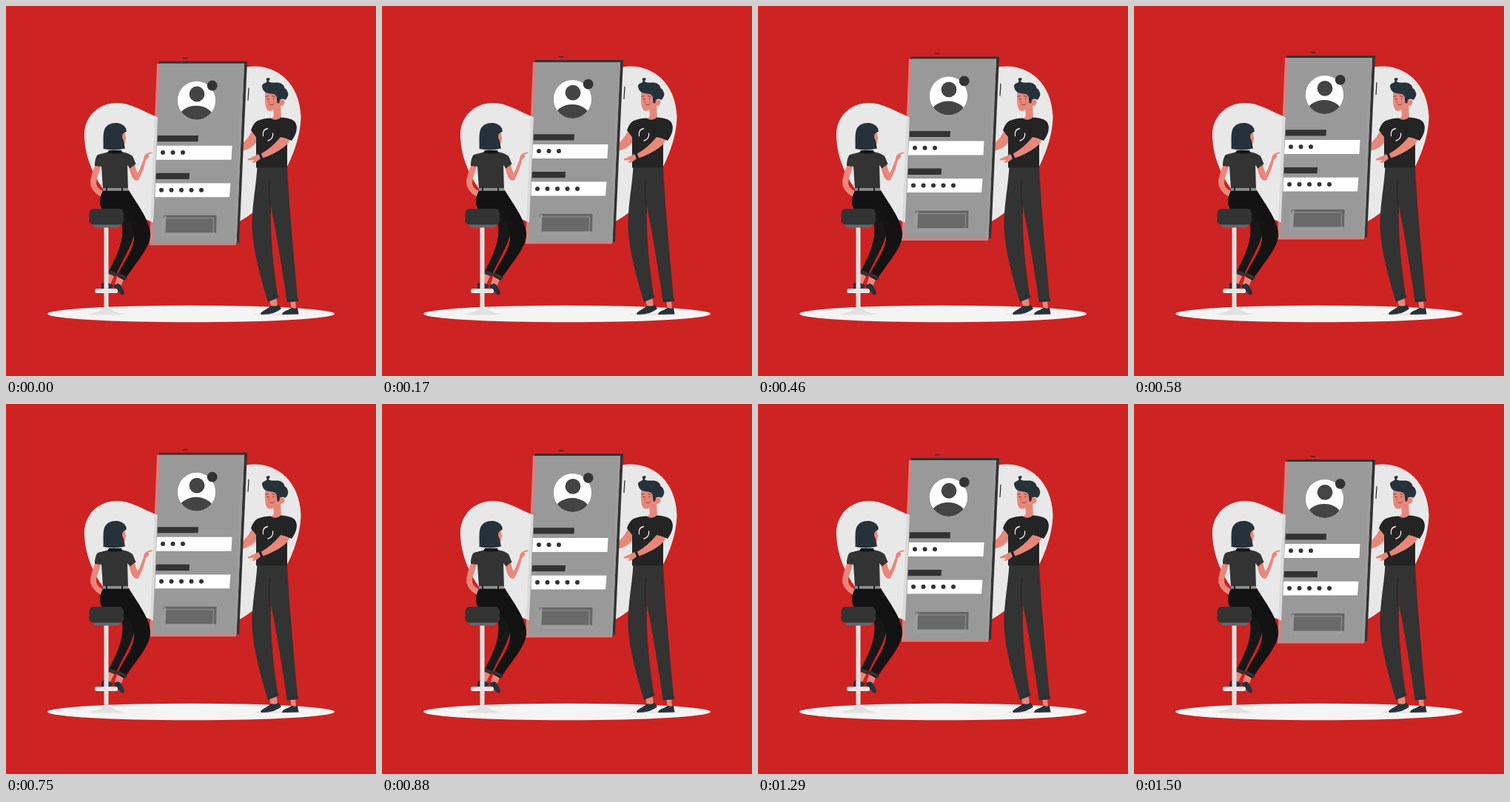
Write an HTML page that moves like this. It is 500 px wide and 500 px high and loops after 1540 ms.

```html
<!DOCTYPE html>
<html lang="en">
<head>
<meta charset="utf-8">
<title>Login illustration</title>
<style>
html, body { margin: 0; width: 100%; height: 100%; overflow: hidden; background: #cd2323; }
svg { display: block; width: 100vw; height: 100vh; }
.skin { fill: #e7877a; }
.navy { fill: #26323a; }
.dark { fill: #333; }
.line { fill: none; stroke-linecap: round; stroke-linejoin: round; }
</style>
</head>
<body>
<svg viewBox="0 0 500 500">
  <defs>
    <clipPath id="face"><ellipse cx="257.5" cy="128" rx="25.6" ry="26"/></clipPath>
  </defs>
  <rect width="500" height="500" fill="#cd2323"/>

  <path fill="#e8e8e8" d="M106 178C104 152 123 131 150 131C169 131 184 142 203 149.500C240 157 270 95 325 82.500C358 76 397 98 398.500 150C398 178 386 210 365 245C349 268 330 284 312 293C270 304 215 302 193 290C172 283 150 268 137 254C120 235 107 205 106 178Z"/>
  <ellipse cx="250" cy="416" rx="194" ry="11.300" fill="#f4f4f4"/>
  <ellipse cx="136" cy="416.500" rx="26" ry="1.600" fill="#e8e8e8"/>
  <ellipse cx="368" cy="416.500" rx="34" ry="1.600" fill="#e6e6e6"/>

  <!-- man -->
  <g id="man">
    <path class="skin" d="M333 167C330 175 324 182 318 187L317 196C327 195 335 190 342 180L343 170Z"/>
    <path class="skin" d="M356 396L365 393L367 405L358 408Z"/>
    <path class="skin" d="M384 398L391 398L392 410L386 410Z"/>
    <path class="navy" d="M344 415C348 411 354 409 358 405C362 406 366 406 368 403L372 409C366 414 358 417 345 417Z"/>
    <path class="navy" d="M373 416C376 411 383 411 386 407.500C389 409 392 409 394 407.500L395.500 416.500L373.500 417Z"/>
    <path class="dark" d="M355 217L380 217C382 260 388 330 394.500 398L380 400C374 362 367 315 357.500 268Z"/>
    <path class="dark" d="M339.500 217L359 217L357.500 280C358 325 363 365 367.500 392L353.500 398.500C344 367 334 330 332.500 300C332 270 338 245 339.500 217Z"/>
    <path class="line" stroke="#252525" d="M357 235C354 252 356 265 357.500 280"/>
    <path class="navy" d="M352.500 395.500L367 389.500L368.500 394L354 400ZM379 396.500L394.500 395L395 399L380 400.500Z"/>
    <path class="skin" d="M361 136L371 133L372 153C367 157 361 156 357.500 153L362 149Z"/>
    <path fill="#242424" d="M340 155C346 152.500 352 151.500 358 151.500C362 155 368 154 371.500 150.500C378 151 386 152 390 156C394 161 393 170 386 181L380 180L380 218.500L338 218.500L338 177L331 168C333 162 336 157 340 155Z"/>
    <path class="skin" d="M384 180C381 187 374 193 365 197.500C357 202 350 205 344 206C339 211 334 213 332 211L336 208.500L327 208.500L327 206.500C333 205 338 200 344 200C352 196 362 188 371 177Z"/>
    <path fill="#242424" d="M372 160L391 158C395 164 392 174 386 182L369 175Z"/>
    <path class="line" stroke="#1d252b" stroke-width="3.200" stroke-linecap="butt" d="M343 199.500L346 206.500"/>
    <path class="line" stroke="#f2f2f2" stroke-width="1.300" d="M347.500 175.500C346.500 170 349 166.500 353.500 165.500M354 182C359 181 361.500 176 360.500 172"/>
    <path class="skin" d="M350.500 114C349.500 124 349.500 137 353.500 141C357.500 143.500 364 140 367 134C373 137 377 133 376.500 129C376 126 372 126 370 127L369 114Z"/>
    <path class="navy" d="M346 107C346 113 349 117 355 118C360 118.500 364 119 365.500 122L366.500 131C369 133 370 130 370 127C373 125 376 126 377 127C380 125 382 121 381 117.500C380 113 378 112 376.500 111C376 106 371 103.500 366 103.500C361 103.500 357 104 355 102C355 100.500 357 100 356.500 97.500C353 96.500 350.500 98 352.500 101C353 104 349 103 346 107Z"/>
    <path class="line" stroke="#26323a" stroke-width=".8" d="M351.500 122.500L354 121.500M360 121.500L363 122.500M357 133C359 134.500 361.500 133.500 362 132"/>
    <circle cx="353.500" cy="125.500" r=".8" class="navy"/><circle cx="361.500" cy="125.500" r=".8" class="navy"/>
    <path class="line" stroke="#d05f55" stroke-width=".9" d="M356 125L354.500 130L356.500 130.500"/>
  </g>

  <!-- phone, drawn at its lowest position -->
  <g id="phone">
    <path fill="#d2d2d2" fill-opacity=".55" d="M204 78L322 78L311 323.500L194 323.500Z"/>
    <path class="dark" d="M207 75L326 75L315 320.500L311 320.500L321.500 78L206 78Z"/>
    <path fill="#999" d="M208 78L322 78L311.500 320.500L198 320.500Z"/>
    <path fill="#9d9d9d" d="M318.500 79L322 78L311.500 320.500L308 320.500Z"/>
    <ellipse cx="257.500" cy="128" rx="25.600" ry="26" fill="#fff"/>
    <ellipse cx="257" cy="153" rx="24" ry="18" fill="#444" clip-path="url(#face)"/>
    <circle cx="258" cy="119.300" r="10.400" fill="#444"/>
    <circle cx="278.700" cy="107.800" r="6.900" class="dark"/>
    <path class="dark" d="M205 175.300H260L259.500 183.500H204.500ZM203 226H248L247.500 234.300H202.500Z"/>
    <path fill="#fff" d="M204 189H305.500L304.500 208H203ZM202 239.700H303.500L302 258.500H201.500Z"/>
    <g id="dots" class="dark"></g>
    <path fill="#696969" d="M216.500 283.500H284L283.500 306.500H215.500Z"/>
    <path class="line" stroke="#adadad" stroke-width=".6" d="M213 287H280.500L280 310H212Z"/>
    <path class="line" stroke="#555" stroke-width=".7" d="M213 287L213.500 283.500H284L283.500 306.500"/>
    <path class="line" stroke="#252525" stroke-width="1.200" d="M328 111.500L327 127.500M239 70.800H245"/>
  </g>

  <!-- woman -->
  <g id="woman">
    <path class="skin" d="M121 214C117 224 113 234 114.500 242C117 251 124 256 131 259L132 251C127 248 122 245 122 239C122 232 126 225 128 217Z"/>
    <path class="skin" d="M166 217L174 214C175 219 176 223 178 226C182 219 184 212 186 207C186 202 189 198 197.500 197.500L197.500 199L192 200.500C195 202 192 206 189 208C187 218 183 228 179 235C175 238 171 233 169 228Z"/>
    <path class="skin" d="M138 362L146 365L140 378L134 377Z"/>
    <path class="skin" d="M150 366L159 370L155 379L147 376Z"/>
    <path class="navy" d="M129 376C132 372 137 374 140 375C145 377 149 383 152 386L157 391L160 389C160 384 156 380 154 376C150 374 147 376 146 378L138 384L129 383Z"/>
    <path fill="#181818" d="M150 270L172 276L174 300C174 319 160 337 148 365L138 361C145 345 160 322 157 296Z"/>
    <path fill="#131313" d="M131 249L166 249C176 266 193 287 195 307C196 326 177 344 160 371L150.500 364.500C156 350 171 333 173 316C174 304 168 291 159 283C148 285 135 283 130 275C126 269 126 260 131 249Z"/>
    <path class="line" stroke="#333" stroke-width="4" stroke-linecap="butt" d="M152 362.500L161.500 367.500M139.500 359L148.500 362.500"/>
    <path class="dark" d="M124 201C130 199 136 198 140 197C146 200 152 199 156 197C162 198 168 200 171 203C173 207 174 210 175.500 213.500L167.500 219.500L164 215L165 248L131 248L129 217L120 216C120 210 121 204 124 201Z"/>
    <path fill="#151515" d="M139 195L156 195L157 198.500C152 200 142 200 137 198.500Z"/>
    <path fill="#8c8c8c" d="M131 246L165 246L165.500 249.700L130.500 249.700Z"/>
    <path fill="#222" d="M135 245.500h2v5h-2zM156 245.500h2v5h-2z"/>
    <path class="skin" d="M155 169L160.500 170L162 179L160.500 186L156 187Z"/>
    <path class="navy" d="M131.500 193C132 184 130.500 174 133 167C136 160 143 157.500 150 158C158 158.500 164 165 162.500 170C157 171.500 156 176 158 180C160 184 160 189 161 192.500C151 195 141 195 131.500 193Z"/>
  </g>

  <!-- stool -->
  <path fill="#666" d="M117 294L155 294L153 299.500L119 299.500Z"/>
  <rect x="112.500" y="274" width="46.500" height="21.500" rx="6" class="dark"/>
  <path fill="#e1e1e1" d="M132.500 299.500h6V408h-6z"/>
  <path fill="#e1e1e1" d="M132.500 407L138.500 407C143 412 150 414 160 416.500L112 416.500C122 414 129 412 132.500 407Z"/>
  <rect x="120" y="382" width="31" height="6" rx="2.500" fill="#e6e6e6"/>
</svg>
<script>
const LOOP = 1540, LIFT = 9.3, LEAD = 40;
const phone = document.getElementById("phone");

function addDots(xs, y) {
  const html = xs.map(x => `<circle cx="${x}" cy="${y}" r="3"/>`).join("");
  document.getElementById("dots").insertAdjacentHTML("beforeend", html);
}
addDots([212, 225.5, 239], 198.2);
addDots([210, 223.5, 237, 250.5, 264], 249);

// Gentle ease in and out, halfway between linear and sine.
const ease = u => (u + (1 - Math.cos(Math.PI * u)) / 2) / 2;

function draw(ms) {
  const p = ((ms + LEAD) % LOOP) / LOOP;
  const up = 1 - Math.abs(1 - 2 * p);
  phone.setAttribute("transform", `translate(0 ${(-LIFT * ease(up)).toFixed(3)})`);
}

const start = performance.now();
function tick() {
  draw(performance.now() - start);
  requestAnimationFrame(tick);
}
draw(0);
requestAnimationFrame(tick);
</script>
</body>
</html>
```
